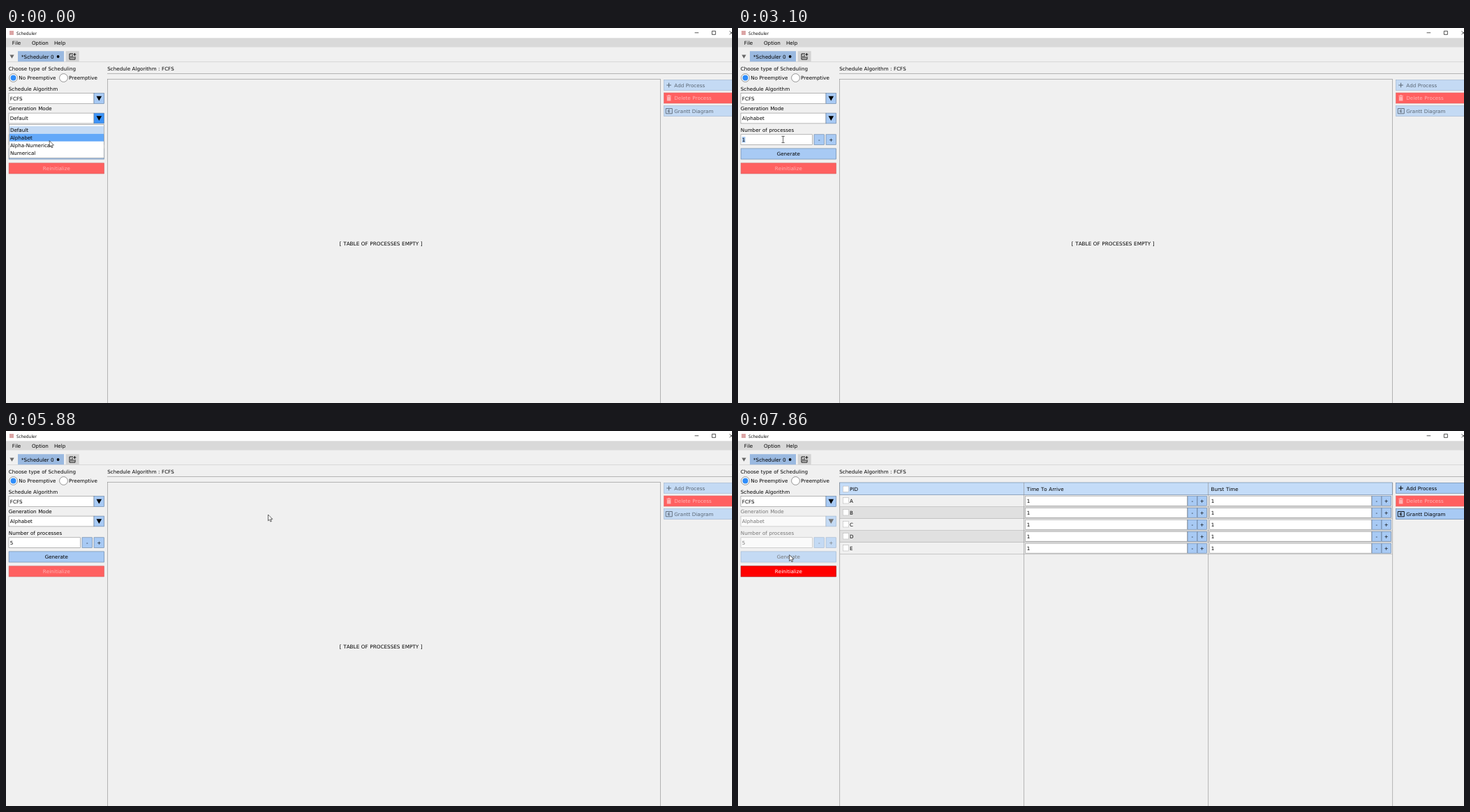
Write an HTML page that moves like this. It is 1040 by 538 pixels and loops after 8000 ms.

```html
<!DOCTYPE html>
<html lang="en">
<head>
<meta charset="utf-8">
<title>Scheduler</title>
<style>
html, body { margin: 0; width: 100%; height: 100%; overflow: hidden; background: #f0f0f0; }
svg { display: block; width: 1040px; height: 538px; }
rect, circle { stroke-width: 0.6; }
text {
  font-family: "DejaVu Sans", sans-serif; text-rendering: geometricPrecision;
  font-kerning: none; word-spacing: 0.034em; white-space: pre;
}
.title { font-family: "Open Sans", sans-serif; }
</style>
</head>
<body>
<svg id="stage" viewBox="0 0 1040 538"></svg>
<script>
const LOOP = 8000;
const INK = '#000', DIM = '#777', LINE = '#8c8c8c', FADED = '#b8b8b8', OFF = '#fafafa';
const BLUE = '#a8caf4', PALE = '#c4daf4', HOT = '#3d94f9', EDGE = '#5f7c9f', PALE_EDGE = '#9fb4cd';
const PINK = '#ffb3b3';

const rect = (x, y, w, h, fill, stroke = 'none') =>
  `<rect x="${x}" y="${y}" width="${w}" height="${h}" fill="${fill}" stroke="${stroke}"/>`;
const path = (d, stroke, fill = 'none', width = 0.6) =>
  `<path d="${d}" stroke="${stroke}" fill="${fill}" stroke-width="${width}"/>`;
const circle = (x, y, r, fill, stroke = 'none') =>
  `<circle cx="${x}" cy="${y}" r="${r}" fill="${fill}" stroke="${stroke}"/>`;
// y is the middle of the capitals
const label = (s, x, y, fill = INK, anchor = 'start', size = 7.15, cls = '') =>
  `<text x="${x}" y="${y + 2.6}" fill="${fill}" text-anchor="${anchor}" font-size="${size}" class="${cls}">${s}</text>`;

const button = (x, y, w, h, s, fill, edge = EDGE, ink = INK) =>
  rect(x, y, w, h, fill, edge) + label(s, x + w / 2, y + h / 2, ink, 'middle');

function combo(y, value, hover, off) {
  return rect(4, y, 122, 14.8, off ? OFF : '#fff', off ? FADED : LINE) +
    rect(126, y, 14.5, 14.8, off ? PALE : hover ? HOT : BLUE, off ? PALE_EDGE : EDGE) +
    path(`M129.5 ${y + 4.1}h7.6l-3.8 6.8z`, 'none', off ? DIM : INK) +
    label(value, 5.8, y + 7.6, off ? DIM : INK);
}

function windowBar() {
  return rect(0, 0, 1040, 14, '#fff') + rect(5, 4, 6, 6, '#dba5a5') +
    label('Scheduler', 15, 7, INK, 'start', 6.25, 'title') +
    path('M986.6 6.8h5.6M1011.4 4.4h5v5h-5zM1036.5 4.4l5 5M1036.5 9.4l5-5', '#111', 'none', 0.7) +
    rect(0, 14.5, 1040, 13, '#d9d9d9') +
    label('File', 8.8, 21.5) + label('Option', 37, 21.5) + label('Help', 69, 21.5);
}

function tabs() {
  return path('M2 48.5H1040', '#c8c8c8') +
    path('M5.4 38.5h6.2l-3.1 5.2z', 'none', '#666') +
    rect(17, 33.2, 66, 15, '#9ab9e0') + rect(85.7, 33.2, 19, 15, '#d3d3d3') +
    label('*Scheduler 0', 22, 41, INK, 'start', 7.2) + circle(74.6, 41, 1.9, INK) +
    path('M96 37H91v8h8v-4M93 43.3v-3M95 43.3v-4.5M97 43.3v-2M98.4 36v4M96.4 38h4', INK, 'none', 0.9);
}

function sideButtons(ready) {
  const ink = ready ? INK : '#5a6673', fill = ready ? BLUE : PALE, edge = ready ? EDGE : PALE_EDGE;
  return rect(942.5, 74.4, 105, 15, fill, edge) + rect(942.5, 93, 105, 15, '#ff6060', '#e06a6a') +
    rect(942.5, 111.6, 105, 15, fill, edge) +
    path('M946.3 82h6.6M949.6 78.7v6.6', ink, 'none', 1) +
    path('M946.3 97.4h6.6M948.4 96.4h2.4', PINK, 'none', 1) +
    path('M946.8 98.5h5.6v6h-5.6z', 'none', PINK) +
    path('M945.3 115.5h9v7.3h-9zM951.2 117.7h-2.7v3h2.7M949.5 119.2h1.7', ink, 'none', 0.9) +
    label('Add Process', 957.3, 82) .replace(`fill="${INK}"`, `fill="${ink}"`) +
    label('Delete Process', 957.3, 100.5, PINK) +
    label('Grantt Diagram', 957.3, 119.2, ink);
}

function form(s) {
  const off = s.table, ink = off ? DIM : INK;
  const fill = off ? PALE : BLUE, edge = off ? PALE_EDGE : EDGE;
  const generate = off ? PALE : s.press ? '#0a84ff' : s.hover === 'generate' ? HOT : BLUE;
  return label('Choose type of Scheduling', 3.8, 58.5) +
    circle(10.5, 71.5, 5.9, '#fff', '#555') + circle(10.5, 71.5, 4, '#2f8dfa') +
    label('No Preemptive', 18.3, 71.7) +
    circle(82.5, 71.5, 5.9, '#fff', '#555') + label('Preemptive', 90, 71.7) +
    label('Schedule Algorithm', 3.8, 87) + combo(93.6, 'FCFS', s.hover === 'algorithm') +
    label('Generation Mode', 3.8, 115.3, ink) + combo(122.1, s.mode, s.hover === 'mode', off) +
    label('Number of processes', 3.8, 146, ink) +
    rect(4, 152.8, 102.4, 14.6, off ? OFF : '#fff', off ? FADED : LINE) +
    (s.selected ? rect(5.8, 156, 4.7, 8.5, BLUE) : '') +
    label(s.count, 5.8, 160.2, ink) +
    (s.caret ? rect(10.4, 156, 0.7, 8.2, INK) : '') +
    button(109, 152.8, 14.4, 14.6, '-', fill, edge, ink) +
    button(126, 152.8, 14.4, 14.6, '+', fill, edge, ink) +
    button(4.1, 172.9, 136.5, 15.2, 'Generate', generate, edge, ink) +
    (off ? button(4.1, 193.8, 136.5, 15.2, 'Reinitialize', '#f00', '#a00000', '#fff')
         : button(4.1, 193.8, 136.5, 15.2, 'Reinitialize', '#ff6060', '#d06a6a', PINK));
}

function popup(lit) {
  const items = ['Default', 'Alphabet', 'Alpha-Numerical', 'Numerical'];
  const fills = [PALE, lit, '#fff', '#fff'];
  return rect(4.3, 138.5, 136.2, 48, '#fff', LINE) +
    items.map((item, i) => rect(5, 140.8 + 11 * i, 135, 11, fills[i]) +
      label(item, 5.9, 146.2 + 11 * i)).join('');
}

function spin(x, y) {
  return rect(x, y, 232, 14, '#fff', LINE) + label('1', x + 2, y + 7.2) +
    button(x + 232.4, y, 13.4, 14, '-', BLUE) + button(x + 246.4, y, 13.4, 14, '+', BLUE);
}

const checkBox = y => rect(150.3, y - 4.2, 8, 8.4, '#fff', '#bbb');

function table() {
  let out = rect(145.6, 74, 792, 17.5, '#c4dcf8', EDGE) + checkBox(83.3);
  ['PID', 'Time To Arrive', 'Burst Time'].forEach((name, i) => {
    out += label(name, [160, 413.8, 677.5][i], 83.2);
  });
  [...'ABCDE'].forEach((pid, i) => {
    const y = 100.2 + 17 * i;
    out += rect(146, y - 8.2, 791, 17, i % 2 ? '#e0e0e0' : '#f0f0f0') +
      path(`M146 ${y + 8.4}H937`, '#aaa') +
      checkBox(y - 0.4) + label(pid, 160, y) + spin(411.7, y - 7) + spin(675.7, y - 7);
  });
  return out + path('M145.6 538V74M409.6 74V538M673.6 74V538M937.6 74V538', LINE);
}

function pointer(s) {
  const shape = s.beam
    ? path('M-2.2-4.6H2.2M0-4.6V4.6M-2.2 4.6H2.2', INK, 'none', 0.6)
    : path('M0 0v8.8l2-1.9 1.4 3.2 1.5-.7-1.4-3h2.8z', INK, '#fff', 0.6);
  return `<g transform="translate(${s.x} ${s.y})">${shape}</g>`;
}

function scene(s) {
  return rect(0, 0, 1040, 538, '#f0f0f0') + windowBar() + tabs() +
    label('Schedule Algorithm : FCFS', 145.3, 58.5) + path('M145 65.5H1040', LINE) +
    (s.table ? table() : rect(145.6, 73.6, 792, 470, '#f0f0f0', LINE) +
      label('[ TABLE OF PROCESSES EMPTY ]', 537.2, 309.5, INK, 'middle', 7.28)) +
    sideButtons(s.table) + form(s) + (s.lit ? popup(s.lit) : '') + pointer(s);
}

// Each step changes only what it names; the rest carries over.
const start = { x: 62.2, y: 161.7, mode: 'Default', count: '1', hover: 'mode', lit: '#62a8f9',
  caret: false, selected: false, beam: false, press: false, table: false };
const steps = [
  [0, {}],
  [280, { x: 64, y: 160.5 }],
  [430, { y: 159.7 }],
  [990, { lit: HOT }],
  [1140, { lit: '', mode: 'Alphabet', hover: '', beam: true, x: 61, y: 160 }],
  [1830, { x: 67 }],
  [1980, { x: 64.6, selected: true, caret: true }],
  [3100, { caret: false }],
  [3380, { caret: true }],
  [3780, { count: '5', selected: false }],
  [4740, { beam: false, x: 66, y: 135, hover: 'mode' }],
  [4860, { x: 67, y: 118.5, caret: false }],
  [5010, { x: 68.5, y: 110.5, hover: '' }],
  [5170, { y: 108.5, caret: true }],
  [5310, { x: 103, y: 122 }],
  [5460, { y: 125, hover: 'mode' }],
  [5610, { x: 118, y: 104, hover: 'algorithm' }],
  [5730, { x: 375.5, y: 143.5, hover: '' }],
  [5880, { y: 120, caret: false }],
  [6000, { y: 96.5, caret: true }],
  [6430, { x: 112, y: 104, hover: 'algorithm', caret: false }],
  [6550, { x: 79, y: 122, hover: '', caret: true }],
  [6700, { x: 76, y: 142, hover: 'mode' }],
  [6850, { x: 74.5, y: 159, hover: '' }],
  [7010, { x: 74, y: 178.5, hover: 'generate' }],
  [7160, { y: 177.7, caret: false }],
  [7590, { x: 73.6, caret: true }],
  [7740, { press: true, caret: false }],
  [7860, { press: false, table: true, hover: '' }]
];
let state = start;
const states = steps.map(([at, change]) => ({ at, ...(state = { ...state, ...change }) }));

const stage = document.getElementById('stage');
let shown = null;
function update(t) {
  const now = states.findLast(s => s.at <= t);
  if (now !== shown) stage.innerHTML = scene(shown = now);
}

const begin = performance.now();
function tick() {
  update((performance.now() - begin) % LOOP);
  requestAnimationFrame(tick);
}
tick();
</script>
</body>
</html>
```
